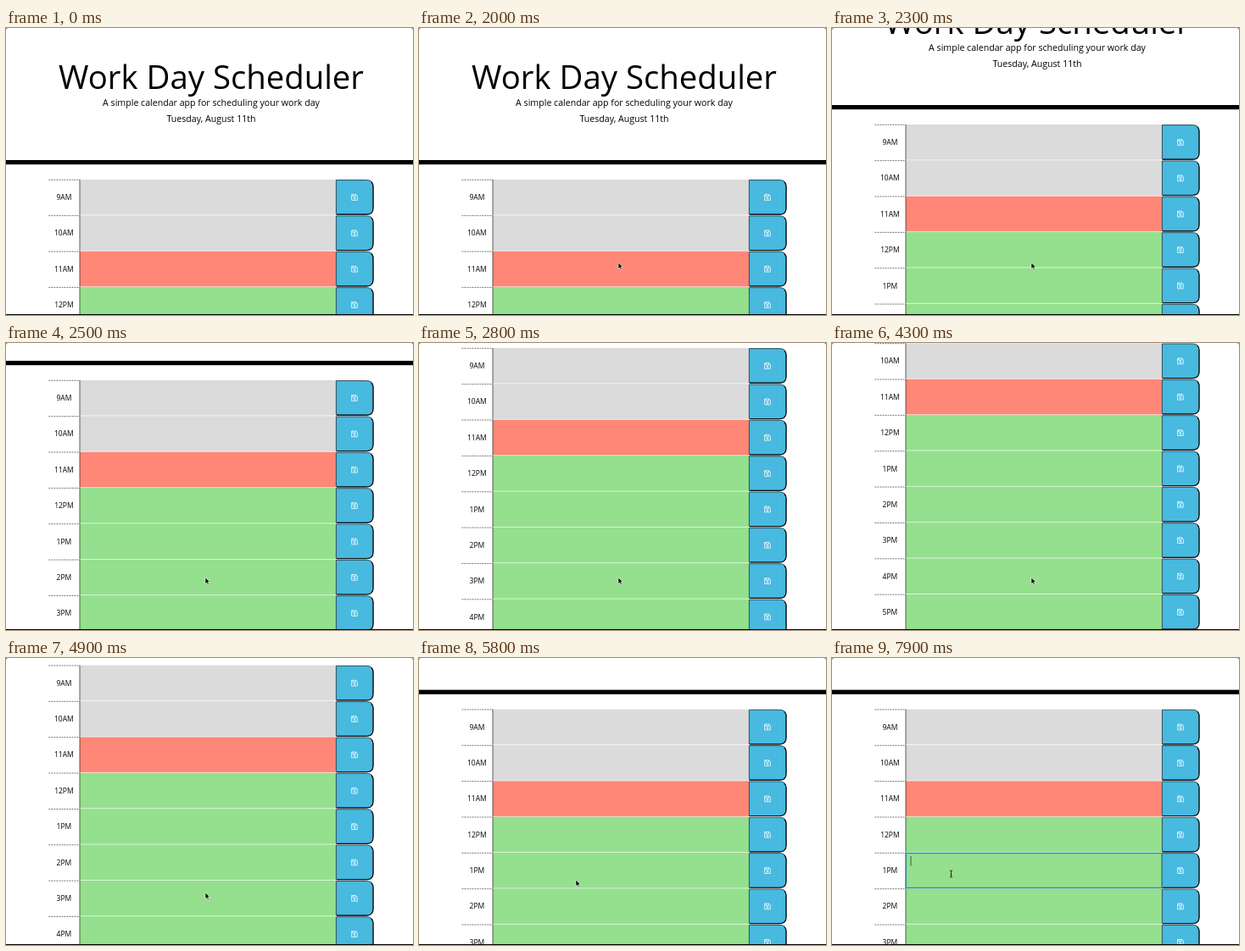
Write an HTML page that moves like this. It is 480x339 px and loops after 8000 ms.

```html
<!DOCTYPE html>
<html lang="en">
<head>
<meta charset="utf-8">
<title>Work Day Scheduler</title>
<style>
html, body { margin: 0; width: 100%; height: 100%; overflow: hidden; background: #fff; }
svg { display: block; width: 480px; height: 339px; }
text { font-family: "Open Sans", sans-serif; text-anchor: middle; fill: #000; }
.hour { font-size: 8.5px; }
</style>
</head>
<body>
<svg viewBox="0 0 480 339">
  <g id="page">
    <text x="242" y="71.6" font-size="38.3">Work Day Scheduler</text>
    <text x="242" y="92.4" font-size="10.62">A simple calendar app for scheduling your work day</text>
    <text x="242" y="111.4" font-size="10.62">Tuesday, August 11th</text>
    <rect y="156" width="480" height="5.2"/>
    <g id="rows"></g>
    <g id="focus">
      <rect x="87.2" y="348.9" width="301.8" height="41" fill="none" stroke="#2f8fa6" stroke-width="1.4"/>
      <path d="M93 352.6v11.2" stroke="#333" stroke-width=".8"/>
    </g>
  </g>
  <path d="M0 0H3Q0 0 0 3ZM480 0H477Q480 0 480 3Z" fill="#777"/>
  <rect y="338" width="480" height="1"/>
  <path id="arrow" d="M0 0V7.6L1.8 6L3 8.7L4.3 8.1L3.1 5.5H5.4Z" fill="#000" stroke="#fff" stroke-width=".6"/>
  <path id="beam" d="M-1.6-4Q0-4 0-3Q0-4 1.6-4M0-3V3M-1.6 4Q0 4 0 3Q0 4 1.6 4M-1 1H1" fill="none" stroke="#222" stroke-width=".9"/>
</svg>
<script>
const $ = id => document.getElementById(id);
const LOOP = 8000, STEP = 100, TOP = 179, PITCH = 42.36;
const hours = ["9AM", "10AM", "11AM", "12PM", "1PM", "2PM", "3PM", "4PM", "5PM"];
const fillFor = i => i < 2 ? "#dbdbdb" : i === 2 ? "#ff8778" : "#94e08e";

$("rows").innerHTML = hours.map((hour, i) => `
  <g transform="translate(0 ${TOP + i * PITCH})">
    <path d="M50.5 .3H87" stroke="#444" stroke-width=".8" stroke-dasharray="1.8 1.2"/>
    <text class="hour" x="68.4" y="24.1">${hour}</text>
    <rect x="87" width="302" height="${PITCH}" fill="${fillFor(i)}"/>
    <path d="M87 42H389" stroke="#fff" stroke-opacity=".75"/>
    <path d="M87 0V42" stroke="#333" stroke-width=".8"/>
    <path d="M389.4 .6H425.5Q433 .6 433 8V33.5Q433 41.2 425.5 41.2H389.4Z" fill="#48b9df" stroke="#263c46" stroke-width=".9"/>
    <path d="M430.8 2.8Q433 5 433 8V33.5Q433 41.2 425.5 41.2H390" fill="none" stroke="#111" stroke-width="1.2"/>
    <g fill="none" stroke="#e9f8fd" stroke-width=".9">
      <path d="M407.6 17.7H412.8L414.3 19.2V24.4H407.6ZM409 17.7V20H412.3V17.7"/>
      <circle cx="411" cy="22.2" r="1"/>
    </g>
  </g>`).join("");

// Keys: time, then values
const scrollKeys = [
  [2000, 0], [2100, 8], [2200, 30], [2300, 65], [2400, 102], [2500, 135], [2600, 154],
  [2700, 166], [2800, 173], [3200, 182], [3400, 182], [3700, 198], [4000, 214], [4300, 221],
  [4500, 221], [4700, 205], [5000, 153], [5200, 128], [5400, 118.4]
];
const cursorKeys = [
  [1500, 380, 310], [1600, 235, 277], [5500, 235, 277], [5800, 185, 262], [6200, 160, 258],
  [6500, 160, 258], [6700, 150, 256], [7000, 150, 256], [7400, 140.5, 255]
];

function at(keys, t) {
  const next = keys.findIndex(k => k[0] > t);
  if (next === 0) return keys[0].slice(1);
  if (next < 0) return keys[keys.length - 1].slice(1);
  const a = keys[next - 1], b = keys[next];
  const p = (t - a[0]) / (b[0] - a[0]);
  return a.slice(1).map((v, i) => v + (b[i + 1] - v) * p);
}

const show = (id, on) => $(id).setAttribute("visibility", on ? "visible" : "hidden");
const move = (id, x, y) => $(id).setAttribute("transform", `translate(${x} ${y})`);

function draw(now) {
  const t = Math.floor(now % LOOP / STEP) * STEP;
  const [x, y] = at(cursorKeys, t);
  move("page", 0, -at(scrollKeys, t)[0]);
  move("arrow", x, y);
  move("beam", x, y);
  show("arrow", t >= 1500 && t < 7100);
  show("beam", t >= 7100);
  show("focus", t >= 7500);
  requestAnimationFrame(draw);
}
draw(0);
</script>
</body>
</html>
```
